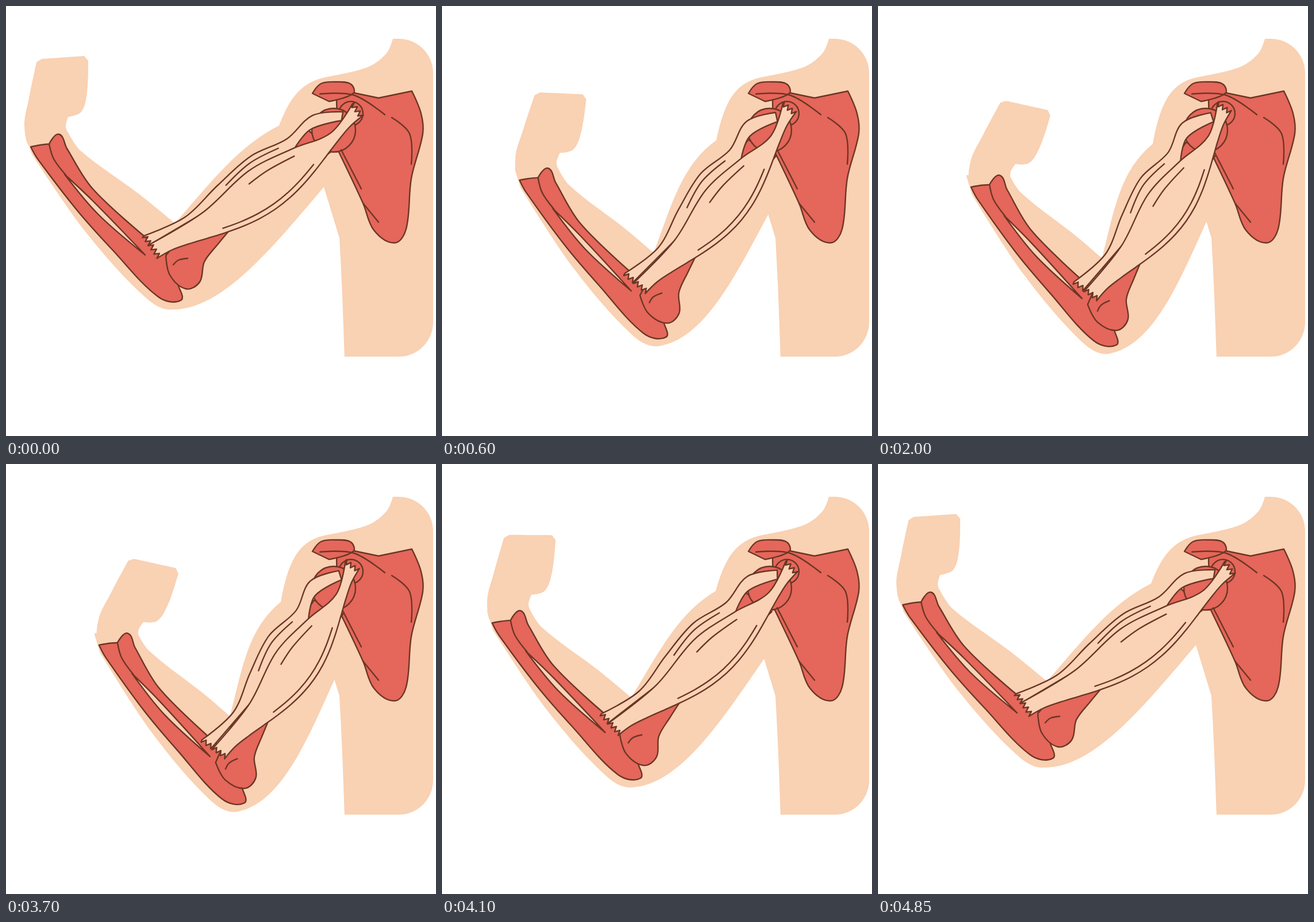
An HTML page with a canvas that plays this animation: 748 px wide and 748 px high, repeating every 5000 ms.

```html
<!DOCTYPE html>
<html lang="en">
<head>
<meta charset="utf-8">
<title>Biceps</title>
<style>
html, body { margin: 0; height: 100%; overflow: hidden; background: #fff; }
canvas { display: block; }
</style>
</head>
<body>
<canvas id="stage" width="748" height="748"></canvas>
<script>
const ctx = document.getElementById('stage').getContext('2d');
const SKIN = '#f9d1b3', MUSCLE = '#fad3b6', BONE = '#e5665a', LINE = '#6b3625';
const SHOULDER = { x: 603, y: 190 }, ELBOW = { x: 292, y: 516 }, WRIST = { x: 75, y: 240 };
const INSERTION = { x: 258, y: 425 }, ELBOW_TIP = { x: 290, y: 528 };
const LOOP = 5000, STEP = 50, RAD = Math.PI / 180;
const ARM_TURN = -17.2, FOREARM_TURN = 18.97, HAND_TURN = 14.5;

// "x,y" is a smooth point, "x,y*" a corner
const points = text => text.split(' ').map(item => {
  const [x, y] = item.split(',').map(parseFloat);
  return { x, y, corner: item.endsWith('*') };
});

const torso = points('673,57* 743,57* 743,610* 589,610* 584,480 580,403* 553,315* 530,200* 560,123* 630,106 662,82');
const hand = points('53,98* 62,92* 136,87* 143,95* 141,150 131,184 108,193* 104,208 106,217* 90,260* 45,250 32,210 40,160');
const forearm = points('107,218* 130,252 230,326 294,378* 310,500* 290,528 245,509 140,395 45,258* 34,225*');
const forearmBones = points('43,245* 58,242 75,240* 92,223 106,248 150,317 240,400* 280,432* 300,487 304,512 265,506 185,424 125,357 55,266');
const radiusEdge = points('75,240 83,266 104,294');
const boneGap = points('102,293* 150,338 242,433* 160,362');
const humerus = points('525,215* 566,253* 460,330* 410,365* 368,415 345,445 337,480 313,492 285,468 278,434* 350,350*');
const condyleLine = points('291,450 300,442 316,439');
const scapula = points('600,150* 648,160* 706,148* 722,187 725,222 705,300 696,388 676,412 640,390 621,343 577,250* 575,163*');
const acromion = points('533,152* 548,135 575,132 600,136 604,152 562,166*');
const scapulaLines = [
  '546,153 605,155 659,189', '671,194 702,222 705,275', '621,343 648,376', '583,250 618,318'
].map(points);

// Muscle edges: share of the length from the shoulder, then px to the side
const shortHeadTop = points('1,13* .75,6 .5,20 .3,8 .14,-7 0,13*');
const longHeadTop = points('.05,11* .16,36 .3,28 .46,39 .64,30 .82,17 1,31*');
const longHeadBase = points('.6,0* .3,6* .2,18 .075,0*');
const fibres = ['.61,22 .48,30 .35,23', '.53,1 .44,2 .315,-4'].map(points);
const bellyEdge = s => -13 - 48 * Math.sin(Math.PI * s) ** 1.5;

const mix = (a, b, u) => a + (b - a) * u;
const between = (a, b, u) => ({ x: mix(a.x, b.x, u), y: mix(a.y, b.y, u) });

function turn(p, pivot, degrees) {
  const c = Math.cos(degrees * RAD), s = Math.sin(degrees * RAD);
  const x = p.x - pivot.x, y = p.y - pivot.y;
  return { x: pivot.x + x * c - y * s, y: pivot.y + x * s + y * c };
}
const onForearm = (p, u) => turn(turn(p, ELBOW, FOREARM_TURN * u), SHOULDER, ARM_TURN * u);

// Point at share s of the line from a to b, shifted sideways by px
function beside(a, b, s, px) {
  const dx = b.x - a.x, dy = b.y - a.y, d = Math.hypot(dx, dy);
  return { x: a.x + dx * s - dy / d * px, y: a.y + dy * s + dx / d * px };
}

const samples = (from, to, n, side) =>
  Array.from({ length: n + 1 }, (_, i) => {
    const x = mix(from, to, i / n);
    return { x, y: side(x) };
  });

// Torn tendon end
const jagged = (s, from, to, teeth) =>
  Array.from({ length: teeth * 2 + 1 }, (_, i) =>
    ({ x: s + (i % 2 ? -0.01 : 0.01) * (s ? 1 : -1), y: mix(from, to, i / teeth / 2), corner: true }));

function trace(pts, closed) {
  const n = pts.length;
  const tangent = i => {
    if (pts[i].corner || (!closed && (i === 0 || i === n - 1))) return [0, 0];
    const a = pts[(i + n - 1) % n], b = pts[(i + 1) % n];
    const d = Math.hypot(b.x - a.x, b.y - a.y) || 1;
    return [(b.x - a.x) / d, (b.y - a.y) / d];
  };
  ctx.beginPath();
  ctx.moveTo(pts[0].x, pts[0].y);
  for (let i = 0; i < (closed ? n : n - 1); i++) {
    const j = (i + 1) % n, p = pts[i], q = pts[j];
    const k = Math.hypot(q.x - p.x, q.y - p.y) / 3;
    const s = tangent(i), e = tangent(j);
    ctx.bezierCurveTo(p.x + s[0] * k, p.y + s[1] * k, q.x - e[0] * k, q.y - e[1] * k, q.x, q.y);
  }
  if (closed) ctx.closePath();
}

function shape(pts, color, outlined) {
  trace(pts, true);
  ctx.fillStyle = color;
  ctx.fill();
  if (outlined) ctx.stroke();
}

function line(pts) {
  trace(pts, false);
  ctx.stroke();
}

function disc(x, y, r) {
  ctx.beginPath();
  ctx.arc(x, y, r, 0, 7);
  ctx.fillStyle = BONE;
  ctx.fill();
  ctx.stroke();
}

function rotated(pivot, degrees, draw) {
  ctx.save();
  ctx.translate(pivot.x, pivot.y);
  ctx.rotate(degrees * RAD);
  ctx.translate(-pivot.x, -pivot.y);
  draw();
  ctx.restore();
}
const withArm = (u, draw) => rotated(SHOULDER, ARM_TURN * u, draw);
const withForearm = (u, draw) => withArm(u, () => rotated(ELBOW, FOREARM_TURN * u, draw));

function drawArmSkin(u) {
  const front = between({ x: 475, y: 208 }, { x: 478, y: 240 }, u);
  const crook = between({ x: 294, y: 378 }, { x: 390, y: 438 }, u);
  const armpit = between({ x: 553, y: 315 }, { x: 571, y: 376 }, u);
  const tip = onForearm(ELBOW_TIP, u);
  const swell = (a, b, s1, px1, s2, px2) => {
    const p = beside(a, b, s1, px1), q = beside(a, b, s2, px2);
    ctx.bezierCurveTo(p.x, p.y, q.x, q.y, b.x, b.y);
  };
  ctx.beginPath();
  ctx.moveTo(560, 123);
  ctx.bezierCurveTo(510, 132, 492, 165, front.x, front.y);
  swell(front, crook, 0.3, 22 + 11 * u, 0.6, 10 + 5 * u);
  ctx.lineTo(tip.x, tip.y);
  swell(tip, armpit, 0.2, 55, 0.6, 25);
  ctx.lineTo(600, 300);
  ctx.fillStyle = SKIN;
  ctx.fill();
}

function drawMuscle(u) {
  const origin = between({ x: 610, y: 181 }, { x: 601, y: 177 }, u);
  const end = onForearm(INSERTION, u);
  const place = (pts, bulge = 1) =>
    pts.map(p => ({ ...beside(origin, end, p.x, p.y * bulge), corner: p.corner }));
  const bulge = 1 + 0.2 * u;

  shape(place([...longHeadTop, ...jagged(1, 30, 13, 2), ...longHeadBase], bulge), MUSCLE, true);
  shape(place([
    ...jagged(0, 13, -14, 3), ...samples(0.06, 0.94, 12, bellyEdge),
    ...jagged(1, -14, 13, 3), ...shortHeadTop
  ]), MUSCLE, true);
  line(place(fibres[0], bulge));
  line(place(fibres[1]));
  line(place(samples(0.27, 0.72, 6, s => bellyEdge(s) + 9)));
}

function ease(p) {
  p = Math.min(1, Math.max(0, p));
  return p < 0.5 ? 4 * p ** 3 : 1 - 4 * (1 - p) ** 3;
}

function render(t) {
  const arm = ease((t - 100) / 800) - ease((t - 3670) / 800);
  const wrist = ease((t - 245) / 800) - ease((t - 3650) / 740);

  ctx.clearRect(0, 0, 748, 748);
  ctx.save();
  ctx.beginPath();
  ctx.roundRect(5, 57, 738, 553, 60);
  ctx.clip();
  ctx.strokeStyle = LINE;
  ctx.lineWidth = 2.4;
  ctx.lineCap = ctx.lineJoin = 'round';

  shape(torso, SKIN);
  drawArmSkin(arm);
  withForearm(arm, () => {
    shape(forearm, SKIN);
    rotated(WRIST, HAND_TURN * wrist, () => shape(hand, SKIN));
  });

  shape(scapula, BONE, true);
  withForearm(arm, () => {
    shape(forearmBones, BONE, true);
    line(radiusEdge);
    shape(boneGap, MUSCLE, true);
  });
  disc(600, 187, 21);
  withArm(arm, () => {
    shape(humerus, BONE, true);
    line(condyleLine);
  });
  disc(570, 216, 38);
  shape(acromion, BONE, true);
  scapulaLines.forEach(line);
  drawMuscle(arm);
  ctx.restore();
}

const start = performance.now();
function tick() {
  const t = (performance.now() - start) % LOOP;
  render(Math.floor(t / STEP) * STEP);
  requestAnimationFrame(tick);
}
tick();
</script>
</body>
</html>
```
